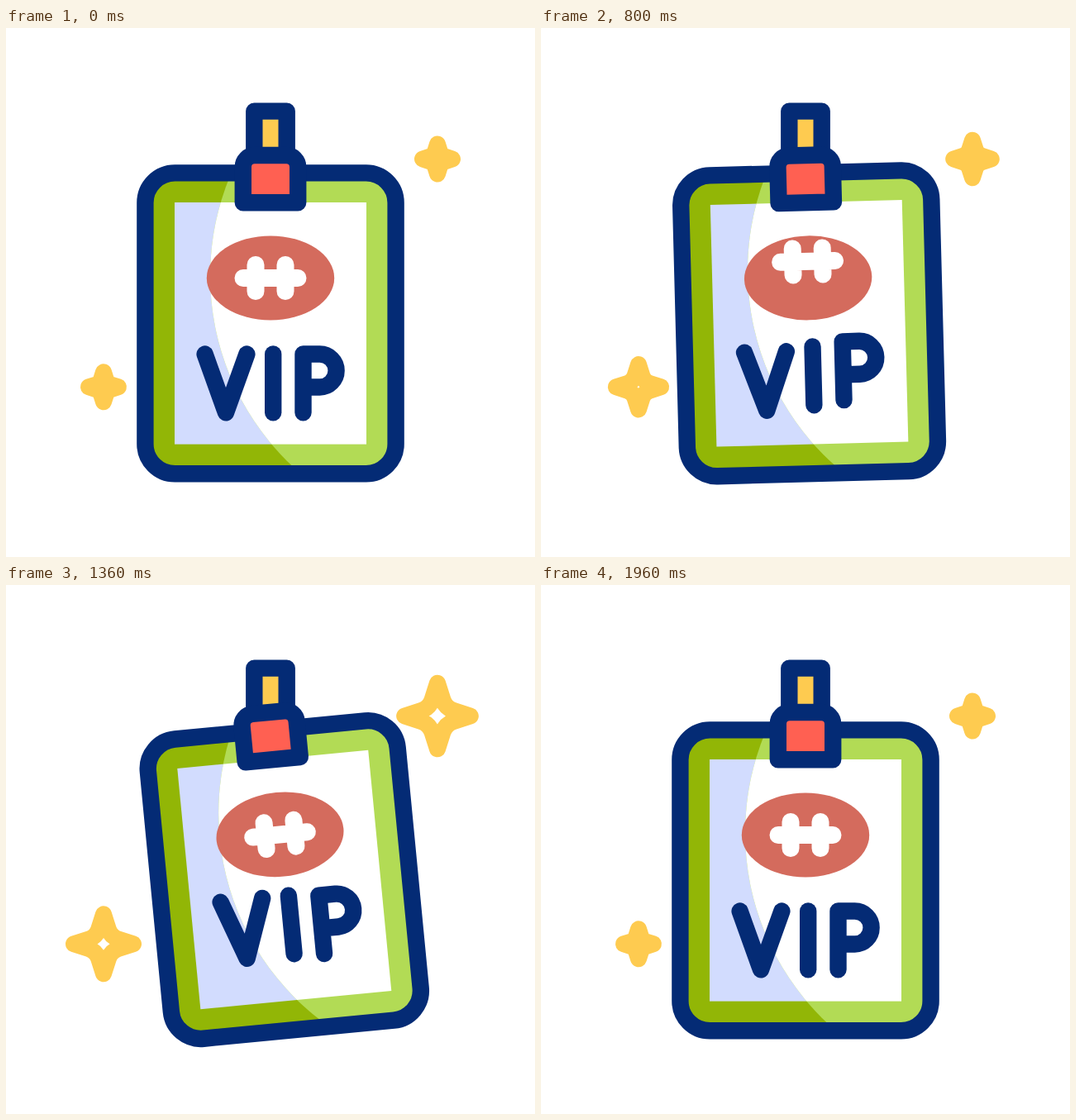
An HTML page that plays this animation: 640 px wide and 640 px high, repeating every 2000 ms.

```html
<!DOCTYPE html>
<html lang="en">
<head>
<meta charset="utf-8">
<title>VIP pass</title>
<style>
  html, body { margin: 0; width: 100%; height: 100%; overflow: hidden; background: #fff; }
  svg { display: block; width: 100%; height: 100%; }
  .line { stroke: #042b75; stroke-width: 20.4; stroke-linecap: round; stroke-linejoin: round; }
  .star { fill: none; stroke: #fecb50; stroke-width: 20; stroke-linejoin: round; }
</style>
</head>
<body>
<svg viewBox="0 0 640 640">
  <defs>
    <clipPath id="lit"><circle cx="563" cy="300" r="316"/></clipPath>
    <clipPath id="ball"><ellipse cx="320" cy="302.4" rx="77.2" ry="51"/></clipPath>
  </defs>

  <path id="starR" class="star" transform="translate(522 158.5)"/>
  <path id="starL" class="star" transform="translate(118 434.3)"/>
  <rect class="line" x="300.3" y="100.6" width="39.4" height="70" fill="#fecb50"/>

  <g id="card">
    <rect x="168.4" y="175.4" width="303.2" height="363.9" rx="36" fill="#92b606"/>
    <rect x="204" y="211" width="232" height="292.6" fill="#d2dcfe"/>
    <g clip-path="url(#lit)">
      <rect x="168.4" y="175.4" width="303.2" height="363.9" rx="36" fill="#b2db55"/>
      <rect x="204" y="211" width="232" height="292.6" fill="#fff"/>
    </g>
    <rect class="line" x="168.4" y="175.4" width="303.2" height="363.9" rx="36" fill="none"/>

    <ellipse cx="320" cy="302.4" rx="77.2" ry="51" fill="#d46b5d"/>
    <g clip-path="url(#ball)">
      <path id="laces" d="M287 302.5H353M302 286.5V318.5M338 286.5V318.5"
            stroke="#fff" stroke-width="21" stroke-linecap="round"/>
    </g>

    <g class="line" fill="none">
      <path id="V" d="M240.6 394.5L266 465.3L291.4 394.5"/>
      <path id="I" d="M323.2 394.5V465.3"/>
      <path id="P" d="M359.5 465.3V394.5H379.6a20 20 0 0 1 0 40H359.5"/>
    </g>

    <path class="line" fill="#ff6052"
          d="M286.8 211.3V168a14 14 0 0 1 14-14h38.4a14 14 0 0 1 14 14V211.3Z"/>
  </g>
</svg>
<script>
const LOOP = 2000;
const el = id => document.getElementById(id);
const ease = p => p * p * (3 - 2 * p);

// keys: [time, value] pairs, eased between neighbours and held at both ends
function at(t, keys) {
  const i = keys.findIndex(k => k[0] > t);
  if (i < 0) return keys[keys.length - 1][1];
  if (i === 0) return keys[0][1];
  const [t0, a] = keys[i - 1], [t1, b] = keys[i];
  return a + (b - a) * ease((t - t0) / (t1 - t0));
}

// evenly spaced keys, 400 ms apart
const swing = (t, start, ...values) => at(t, values.map((v, i) => [start + i * 400, v]));
const pulse = (t, start, lo, hi) => swing(t, start, lo, hi, lo, hi, lo);

// four-pointed star outline with tips at distance d from its centre
function starPath(d) {
  let path = "";
  for (let i = 0; i < 4; i++) {
    const c = [1, 0, -1, 0][i], s = [0, 1, 0, -1][i];
    const pt = (x, y) => `${(x * c - y * s) * d} ${(x * s + y * c) * d}`;
    path += `${i ? "L" : "M"}${pt(0, -1)}L${pt(.16, -.5)}Q${pt(.244, -.244)} ${pt(.5, -.16)}`;
  }
  return path + "Z";
}

// laces leave through the top of the ball and return from below, twice
const laceKeys = [
  [120, 0], [320, -90], [320, 90], [520, 90], [740, 0],
  [940, -90], [940, 90], [1120, 90], [1340, 0]
];

const shiftY = (id, y) => el(id).setAttribute("transform", `translate(0 ${y})`);

function draw(t) {
  el("starR").setAttribute("d", starPath(pulse(t, 120, 18, 40.5)));
  el("starL").setAttribute("d", starPath(pulse(t, 200, 18, 36.5)));
  el("card").setAttribute("transform", `rotate(${swing(t, 200, 0, -8.5, 5.4, -5.8, 0)} 320 182.4)`);
  shiftY("laces", at(t, laceKeys));
  ["V", "I", "P"].forEach((id, i) => shiftY(id, -pulse(t, 120 + i * 80, 0, 18)));
}

const begin = performance.now();
function frame() {
  draw((performance.now() - begin) % LOOP);
  requestAnimationFrame(frame);
}
draw(0);
requestAnimationFrame(frame);
</script>
</body>
</html>
```
